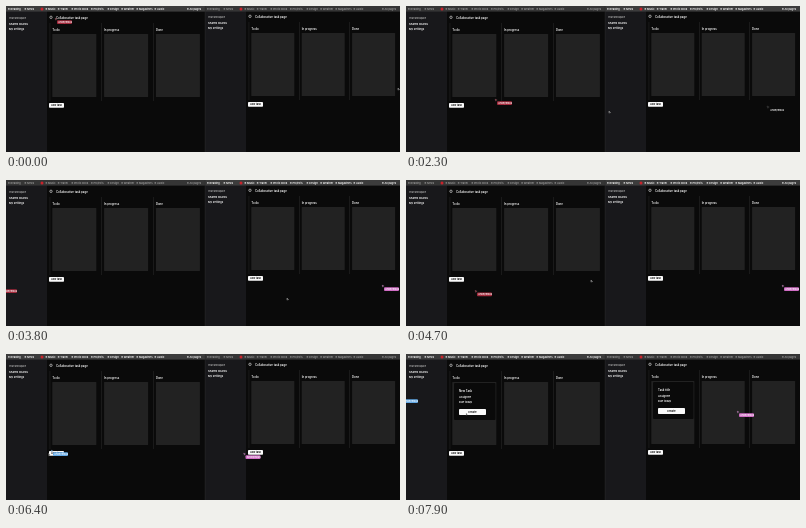
Write an HTML page that moves like this. It is 394 by 146 pixels and loops after 8 s.

```html
<!DOCTYPE html>
<html lang="en">
<head>
<meta charset="utf-8">
<title>Shared task board</title>
<style>
  html, body { margin: 0; width: 100%; height: 100%; overflow: hidden; background: #0a0a0a; }
  svg { display: block; width: 100%; height: 100%; }
  text { font-family: Inter, Arial, sans-serif; font-weight: 600; }
</style>
</head>
<body>
<svg id="stage" viewBox="0 0 394 146">
  <defs>
    <clipPath id="clip0"><path d="M0 0H199V146H0z"/></clipPath>
    <clipPath id="clip1"><path d="M199 0H394V146H199z"/></clipPath>
  </defs>
</svg>
<script>
const LOOP = 8000, STEP = 100, LAG = 400;
const SPLIT = 199, BORDER = 193;
const stage = document.getElementById('stage');

function add(parent, tag, attrs, text) {
  const node = document.createElementNS('http://www.w3.org/2000/svg', tag);
  for (const key in attrs) node.setAttribute(key, attrs[key]);
  if (text) node.textContent = text;
  parent.append(node);
  return node;
}
const box = (parent, x, y, width, height, fill, rx = 0) =>
  add(parent, 'rect', { x, y, width, height, fill, rx });
const label = (parent, x, y, text, size = 2.7, fill = '#fff') =>
  add(parent, 'text', { x, y, 'font-size': size, fill }, text);
const show = (node, on) => node.setAttribute('visibility', on ? 'visible' : 'hidden');

function makeToolbar(page, width) {
  const bar = box(page, 0, 0, width, 5.6, '#3c3c3c');
  const marks = add(page, 'g');
  const bookmark = (x, name) => {
    box(marks, x, 2, 1.7, 1.7, '#bbb', .4);
    label(marks, x + 2.5, 3.9, name, 2.6);
  };
  bookmark(2, 'Reading');
  bookmark(18.5, 'News');
  add(page, 'circle', { cx: 36, cy: 2.9, r: 1.5, fill: '#c8232c' });
  let x = 39.5;
  for (const name of ['Music', 'Travel', 'Photo book', 'Projects', 'Design', 'Weather', 'Magazines', 'Audio']) {
    bookmark(x, name);
    x += 5 + name.length * 1.45;
  }
  bookmark(width - 18, 'All pages');
  return active => {
    bar.setAttribute('fill', active ? '#3c3c3c' : '#353535');
    marks.setAttribute('opacity', active ? 1 : .5);
  };
}

function makePointer(parent) {
  const group = add(parent, 'g');
  add(group, 'path', { d: 'M0 0L2.2 1L1.2 1.3L.8 2.3z', stroke: '#999', 'stroke-width': .2 });
  box(group, 2, 2.2, 15, 3.9, null, 1);
  label(group, 3.2, 5.1, 'Anonymous', 2.4);
  return (point, color) => {
    show(group, point);
    if (!point) return;
    group.setAttribute('transform', `translate(${point})`);
    group.setAttribute('fill', color);
  };
}

function makeWindow(index, x, width, dy, pitch, cardWidth) {
  const root = add(stage, 'g', { 'clip-path': `url(#clip${index})` });
  const frame = add(root, 'g', { transform: `translate(${x})` });
  box(frame, 0, 0, 41, 146, '#18181b');
  const setActive = makeToolbar(frame, width);
  const page = add(frame, 'g', { transform: `translate(0 ${dy})` });

  label(page, 3, 13.2, 'Your workspace', 2.2, '#bbb');
  label(page, 3, 18.7, 'Shared boards');
  label(page, 3, 24.1, 'My settings');
  add(page, 'circle', { cx: 45, cy: 11.3, r: 1.2, fill: 'none', stroke: '#eee', 'stroke-width': .6 });
  label(page, 50, 12.5, 'Collaborative task page', 2.8);

  ['To do', 'In progress', 'Done'].forEach((name, i) => {
    const left = 46.3 + i * pitch;
    box(page, left - 2.6, 17, .5, 78, '#2b2b2b');
    label(page, left, 25, name, 2.8);
    box(page, left, 28, cardWidth, 63, '#222', .5);
  });

  box(page, 43, 97, 15, 4.8, '#fafafa', .8);
  label(page, 45, 100.4, 'Add task', 2.6, '#000');

  const dialog = add(page, 'g');
  box(dialog, 48, 29, cardWidth - 2.5, 37, '#0a0a0a', 1);
  label(dialog, 53, 37.5, index ? 'Task title' : 'New Task', 2.8);
  label(dialog, 53, 44, 'Assignee');
  label(dialog, 53, 49, 'Due today');
  box(dialog, 53, 55, 27, 6, '#fafafa', .8);
  label(dialog, 62, 59, 'Create', 2.7, '#000');

  return { setActive, showDialog: on => show(dialog, on), movePointer: makePointer(root) };
}

// One mouse, [time, x, y], crosses between both windows.
const mousePath = [
  [-400, 248, 12], [-50, 248, 12], [0, 392, 82], [250, 392, 82], [600, 290, 112],
  [1100, 162, 101], [1200, 197, 101], [1600, 303, 112], [1900, 288, 93], [2300, 203, 105],
  [2800, 110, 110], [3300, 177, 106], [3400, 193, 107], [3800, 281, 118], [4100, 281, 118],
  [4600, 244, 96], [4700, 185, 100], [5000, 129, 103], [5400, 149, 79], [6000, 38.5, 100],
  [6800, 47, 99], [7200, 194, 43], [7500, 132, 58], [7900, 60, 59]
];

function mouseAt(time) {
  const next = mousePath.findIndex(point => point[0] > time);
  if (next < 0) return mousePath.at(-1).slice(1);
  const [t0, x0, y0] = mousePath[next - 1], [t1, x1, y1] = mousePath[next];
  const u = (time - t0) / (t1 - t0), k = u * u * (3 - 2 * u);
  return [x0 + (x1 - x0) * k, y0 + (y1 - y0) * k];
}

// Each window mirrors, late, where the mouse last was in the other one.
function mirrored(time, fromRight) {
  for (let t = time - LAG; t >= -LAG; t -= STEP) {
    const [x, y] = mouseAt(t);
    if (x >= BORDER === fromRight) return fromRight ? [x - SPLIT, y] : [x + SPLIT, y - 1];
  }
  return null;
}

box(stage, 0, 0, 394, 146, '#0a0a0a');
const leftWindow = makeWindow(0, 0, 199, 0, 51.8, 44);
const rightWindow = makeWindow(1, SPLIT, 195, -1, 50.4, 43);
box(stage, 198.8, 0, .6, 146, '#2a2a2a');
const mouse = add(stage, 'path', { d: 'M0 0L0 2.2L.6 1.7L1.5 1.6z', fill: '#111', stroke: '#ddd', 'stroke-width': .4 });

function render(time) {
  const rightActive = (time >= 1300 && time < 2700) || (time >= 3300 && time < 5000);
  leftWindow.setActive(!rightActive);
  rightWindow.setActive(rightActive);
  leftWindow.showDialog(time >= 7100);
  rightWindow.showDialog(time >= 7200);
  leftWindow.movePointer(mirrored(time, true), time < 5000 ? '#a32a3c' : '#62a8e5');
  rightWindow.movePointer(mirrored(time, false), time < 2700 ? '#0a0a0a' : '#cf6cc4');
  mouse.setAttribute('transform', `translate(${mouseAt(time)})`);
}

const start = performance.now();
function tick() {
  const elapsed = (performance.now() - start) % LOOP;
  render(Math.floor(elapsed / STEP) * STEP);
  requestAnimationFrame(tick);
}
tick();
</script>
</body>
</html>
```
